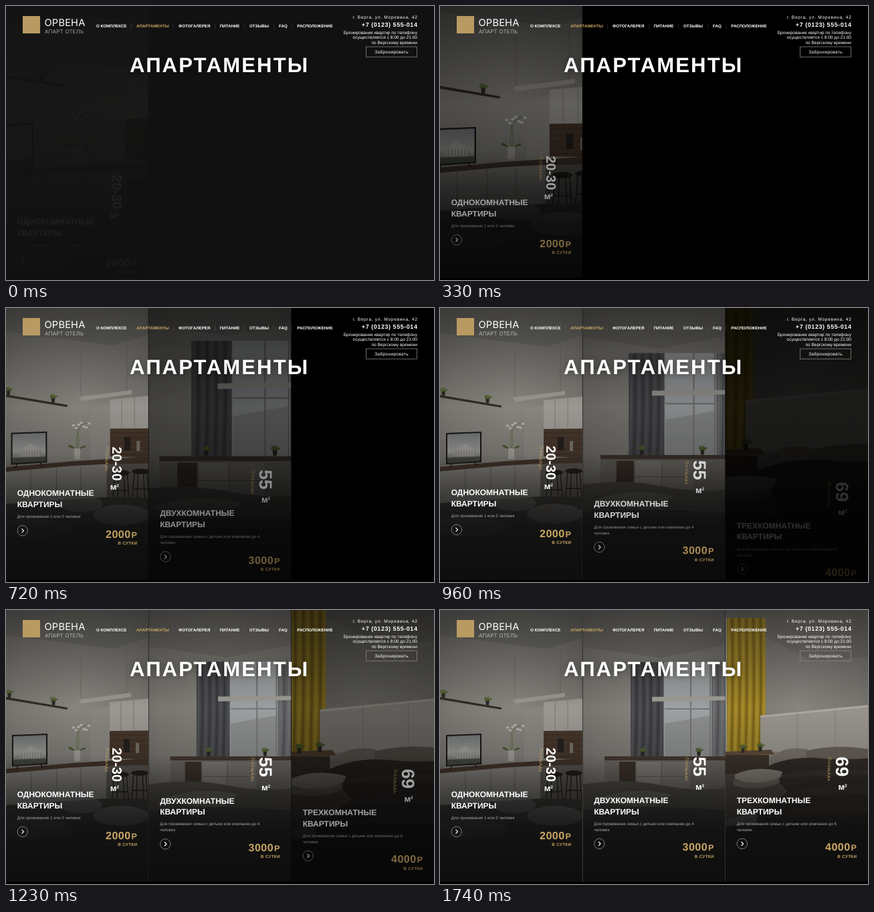
These frames come from a looping animation (640x410 px, 2700 ms). An HTML page:

```html
<!DOCTYPE html>
<html lang="ru">
<head>
<meta charset="utf-8">
<title>Апартаменты</title>
<style>
html, body { margin: 0; width: 100%; height: 100%; overflow: hidden; background: #000; }
svg { display: block; width: 640px; height: 410px; }
text { font-family: "Liberation Sans", Arial, sans-serif; fill: #fff; text-rendering: geometricPrecision; white-space: pre; }
.b { font-weight: 700; }
.gold { fill: #c9a765; }
.dim { fill: #a9a9a7; }
.logo { font-family: Inter, "Open Sans", sans-serif; }
.end { text-anchor: end; }
.mid { text-anchor: middle; }
.title { filter: drop-shadow(0 1px 5px rgba(0,0,0,.4)); }
</style>
</head>
<body>
<svg id="stage" viewBox="0 0 640 410"></svg>
<script>
const LOOP = 2700, STEP = 30, STAGGER = 450, RISE = 900, LEAD = 27;

// drawing helpers
const text = (x, y, size, str, cls = '', gap = 0, extra = '') =>
  `<text x="${x}" y="${y}" font-size="${size}" class="${cls}" letter-spacing="${gap}" ${extra}>${str}</text>`;
const down = (x, y, size, str, cls, gap) =>
  text(0, 0, size, str, cls, gap, `transform="translate(${x} ${y}) rotate(90)"`);
const rect = (x, y, w, h, fill, o = 1) =>
  `<rect x="${x}" y="${y}" width="${w}" height="${h}" fill="${fill}" opacity="${o}"/>`;
const poly = (pts, fill, o = 1) => `<polygon points="${pts}" fill="${fill}" opacity="${o}"/>`;
const path = (d, fill, o = 1) => `<path d="${d}" fill="${fill}" opacity="${o}"/>`;
const line = (d, color, w = 1, o = 1) =>
  `<path d="${d}" fill="none" stroke="${color}" stroke-width="${w}" opacity="${o}"/>`;
const oval = (x, y, rx, ry, fill, o = 1) =>
  `<ellipse cx="${x}" cy="${y}" rx="${rx}" ry="${ry}" fill="${fill}" opacity="${o}"/>`;
const range = (n, fn) => Array.from({ length: n }, (_, i) => fn(i)).join('');

const plant = (x, y, s = .7) =>
  range(9, i => {
    const a = (i - 4) * 0.25, r = s * (8 + (i % 3) * 1.5);
    return line(`M${x} ${y} L${x + Math.sin(a) * r} ${y - Math.cos(a) * r}`, i % 2 ? '#66753a' : '#465527', 1.4);
  }) + poly(`${x - 4 * s},${y - 1} ${x + 4 * s},${y - 1} ${x + 3 * s},${y + 8 * s} ${x - 3 * s},${y + 8 * s}`, '#2d2b28');

const folds = (x, y, w, bottom, n, base, dark, light) =>
  rect(x, y, w, bottom - y, base) + range(n, i => {
    const fx = x + (i + .5) * w / n;
    return line(`M${fx} ${y} Q${fx + 2} ${(y + bottom) / 2} ${fx - 1} ${bottom}`, i % 2 ? dark : light, w / n * .55, .6);
  });

const kitchen = () =>
  rect(-60, -60, 340, 530, 'url(#wall)') +
  poly('-60,-60 280,-60 280,20 160,58 -60,30', '#55534f', .3) +
  line('M112 134V70M180 126V60', '#5b5853', .4) +
  poly('109,134 187,124 187,130 113,140', '#a5a29c') +
  poly('-60,120 92,146 92,149 -60,124', '#352b24') +
  plant(5, 126) + plant(71, 137) +
  poly('126,150 158,144 158,235 126,232', '#918e88') +
  poly('155,138 280,126 280,180 155,181', '#a5a29c') +
  line('M172 138V180M191 135V179', '#75726c', .7) +
  poly('155,181 280,180 280,226 155,222', '#49382c') +
  range(5, i => line(`M155 ${187 + i * 8}H213`, '#36291f', .8)) +
  rect(176, 193, 9, 20, '#24201d') + rect(194, 199, 5, 15, '#7b766c') +
  poly('-60,243 100,229 213,222 280,224 280,232 95,237 -60,251', '#44362b') +
  poly('-60,250 95,236 150,233 150,284 -60,300', '#8d8a84') +
  line('M38 242V284M76 239V281M112 237V279', '#5d5a55', .8) +
  poly('150,233 280,231 280,285 150,284', '#5d5953') +
  poly('9,187 62,185 62,231 9,234', '#181715') +
  poly('11,189 60,187 60,229 11,232', 'url(#screen)') +
  poly('22,216 30,207 37,203 44,207 53,213 53,222 22,222', '#a8a6a0', .75) +
  range(8, i => line(`M${24 + i * 4} 213v9`, '#6c6963', .8)) +
  poly('11,224 60,222 60,229 11,232', '#3b4038', .8) +
  line('M18 233l-3 6M52 231l3 5', '#151412', 1.4) +
  line('M106 212Q104 190 110 180T124 174M107 212Q112 192 104 178', '#5f7040', .9) +
  range(7, i => oval(101 + i * 3.8, 176 + Math.sin(i * 1.7) * 4, 2.3, 1.8, '#c2beb8')) +
  path('M106 212Q92 200 94 208ZM107 212Q120 202 119 208Z', '#4a5a31') +
  rect(102, 210, 9, 16, '#aaa7a1') +
  range(2, i => {
    const x = 171 + i * 29, y = 246 - i * 2;
    return oval(x, y, 13, 4, '#211d1a') +
      line(`M${x - 9} ${y}l-4 48M${x + 9} ${y}l4 48M${x - 4} ${y}l-1 40M${x + 4} ${y}l2 40M${x - 11} ${y + 26}h22`, '#1a1715', 1.3);
  }) +
  poly('-60,296 150,282 280,284 280,470 -60,470', '#3d3a37') +
  oval(112, 292, 32, 12, '#7d7a75', .6) + oval(172, 308, 42, 15, '#8a8782', .6) +
  oval(40, 328, 60, 14, '#615e59', .5);

const lounge = () =>
  rect(150, -60, 340, 530, 'url(#wall)') +
  poly('150,-60 490,-60 490,40 330,72 150,46', '#5a5853', .3) +
  rect(330, 78, 160, 143, '#a9acae') +
  poly('336,170 404,158 404,220 336,220', '#8e8f8d', .7) +
  line('M334 78V220M375 78V220M404 78V220M336 148H404', '#7c7d7c', 2) +
  folds(285, 78, 49, 219, 9, '#4a4b4e', '#333437', '#5c5d60') +
  folds(406, 78, 80, 219, 13, '#6c6d6f', '#4c4d4f', '#7d7e80') +
  line('M325 130V74M420 130V74', '#5d5b57', .5) +
  poly('317,130 428,129 428,135 317,137', '#aaa7a1') +
  poly('246,219 490,219 490,225 246,225', '#463a31') +
  rect(246, 225, 244, 58, '#726e68') +
  rect(268, 227, 24, 46, '#3f332b') + rect(294, 227, 36, 46, '#8c8882') + rect(332, 227, 42, 46, '#827e78') +
  line('M294 249H330M332 249H374', '#57534d', .8) +
  plant(303, 213) + plant(387, 213) +
  path('M150 275Q250 246 330 262T490 254V470H150Z', '#55514b') +
  path('M236 282Q290 262 346 276L328 293Q276 298 236 282Z', '#8a857e', .5) +
  path('M150 310Q270 283 490 305V470H150Z', '#3f3c38');

const bedroom = () =>
  rect(365, -60, 340, 530, 'url(#wall)') +
  poly('365,-60 705,-60 705,62 560,78 470,32', '#66625b', .3) +
  rect(365, 12, 72, 203, '#a3a5a3') +
  line('M431 60V210', '#6f706d', 2) +
  folds(429, 12, 58, 217, 11, '#a08424', '#6c5516', '#c2a239') +
  poly('479,158 705,136 705,216 479,212', '#a29e96') +
  poly('479,158 705,136 705,139 479,161', '#b8b3aa') +
  line('M534 154V213M591 149V213', '#8a857d', .8) +
  poly('427,212 495,209 500,216 427,218', '#5f4d3b') +
  rect(427, 217, 65, 35, '#3f342c') +
  plant(479, 206) + plant(453, 208) +
  path('M492 224Q512 203 548 208L566 216Q535 228 494 231Z', '#7d766d') +
  path('M548 211Q588 200 640 208H705V226Q590 229 548 220Z', '#6b645b') +
  path('M482 238Q520 217 570 222T705 215V470H440Q480 310 482 238Z', '#332d28') +
  path('M490 252Q560 231 705 244M500 280Q570 252 705 272M512 304Q580 278 705 304', '#4a4139', .4) +
  path('M365 258Q420 238 500 250L520 272Q440 330 365 310Z', '#544d45') +
  path('M441 246Q474 232 512 242Q512 250 500 256Q464 263 441 253Z', '#a09a91', .85) +
  path('M438 254Q470 264 508 250V258Q480 273 440 263Z', '#7a746c', .85) +
  path('M365 338Q500 300 705 330V470H365Z', '#2b2724');

// offsets inside a card; the last two cards share one layout
const narrow = { top: 280, areaX: 158.8, areaY: 206, areaSize: 20, labelX: 149.1, unitX: 155.7, unitY: 271, priceY: 342.8 };
const wide = { top: 289, areaX: 165.2, areaY: 219.5, areaSize: 26.7, labelX: 153.2, unitX: 168.5, unitY: 269, priceY: 360.3 };
const cards = [
  { ...narrow, x: 0, scene: kitchen, name: 'ОДНОКОМНАТНЫЕ', note: ['Для проживания 1 или 2 человек'], area: '20-30', price: '2000' },
  { ...wide, x: 213.5, scene: lounge, name: 'ДВУХКОМНАТНЫЕ', area: '55', price: '3000',
    note: ['Для проживания семьи с детьми или компании до 4', 'человек'] },
  { ...wide, x: 427, scene: bedroom, name: 'ТРЕХКОМНАТНЫЕ', area: '69', price: '4000',
    note: ['Для проживания семьи с детьми или компании до 6', 'человек'] }
];

const info = c => {
  const left = c.x + 16.7, right = c.x + 196, unit = c.x + c.unitX;
  const ring = c.top + 42.7 + c.note.length * 9, cx = c.x + 24.8;
  return down(c.x + c.areaX, c.areaY, c.areaSize, c.area, 'b', 0) +
    down(c.x + c.labelX, c.areaY + .8, 6.67, 'Площадь', 'gold', 1.1) +
    text(unit, c.unitY, 13, 'м', 'b') + text(unit + 9.5, c.unitY - 4, 6.5, '2', 'b') +
    text(left, c.top, 12, c.name, 'b') + text(left, c.top + 16.5, 12, 'КВАРТИРЫ', 'b') +
    c.note.map((s, i) => text(left, c.top + 32.8 + i * 9, 6.2, s, 'dim')).join('') +
    `<circle cx="${cx}" cy="${ring}" r="7.7" fill="none" stroke="#aaa" stroke-width=".7"/>` +
    line(`M${cx - 1.3} ${ring - 3}l3 3l-3 3`, '#fff', 1.2) +
    text(c.x + 149, c.priceY, 16, c.price, 'b gold', .5) +
    text(right, c.priceY, 12.6, 'Р', 'b gold end') +
    text(right + .3, c.priceY + 10.2, 6.3, 'В СУТКИ', 'b gold end', .3);
};

const card = (c, i) => `<g id="card${i}" clip-path="url(#clip${i})">
  <g class="scene">${c.scene()}</g>
  ${rect(c.x, 0, 213, 410, 'url(#shade)')}
  <g class="info">${info(c)}</g></g>`;

const menu = [[135, 'О КОМПЛЕКСЕ'], [195, 'АПАРТАМЕНТЫ'], [258, 'ФОТОГАЛЕРЕЯ'], [319.7, 'ПИТАНИЕ'],
  [364, 'ОТЗЫВЫ'], [408, 'FAQ'], [435.3, 'РАСПОЛОЖЕНИЕ']];

const header = () =>
  rect(25, 15, 26, 26, '#b99a62') +
  text(57.5, 30, 14.6, 'ОРВЕНА', 'logo', .2) +
  text(58, 41.2, 7.9, 'АПАРТ ОТЕЛЬ', 'logo', .3, 'font-weight="300" opacity=".8"') +
  menu.map(([x, s], i) => text(x, 32.4, 6.2, s, i === 1 ? 'b gold' : 'b') +
    (i ? rect(x - 7.6, 26, .6, 9, '#666', .5) : '')).join('') +
  text(615.5, 19.4, 6.67, 'г. Верга, ул. Моревина, 42', 'end', .65) +
  text(615.5, 31.2, 9, '+7 (0123) 555-014', 'b end', .55) +
  ['Бронирование квартир по телефону', 'осуществляется с 8:00 до 21:00', 'по Вергскому времени']
    .map((s, i) => text(615, 42 + i * 7.4, 6.55, s, 'end')).join('') +
  '<rect x="538.5" y="61" width="76" height="15.2" fill="none" stroke="#8a867e" stroke-width=".8"/>' +
  text(576.6, 71, 6.67, 'Забронировать', 'mid', .25) +
  text(185, 99.4, 31.1, 'АПАРТАМЕНТЫ', 'b title', 2.1);

const stops = list => list.map(([at, color, o = 1]) =>
  `<stop offset="${at}" stop-color="${color}" stop-opacity="${o}"/>`).join('');

const stage = document.getElementById('stage');
stage.innerHTML = `<defs>
  <radialGradient id="wall" cx=".5" cy=".38" r=".55">${stops([[0, '#918e88'], [.5, '#827f79'], [1, '#666460']])}</radialGradient>
  <linearGradient id="screen" x2="0" y2="1">${stops([[0, '#74787b'], [.6, '#a09f9a'], [1, '#5c5d57']])}</linearGradient>
  <linearGradient id="shade" x2="0" y2="1">${stops([[0, '#0c0c0c', .5], [.2, '#0c0c0c', .26], [.36, '#0c0c0c', .07],
    [.53, '#0c0c0c', .2], [.66, '#0c0c0c', .56], [.8, '#0c0c0c', .85], [1, '#0c0c0c', .97]])}</linearGradient>
  ${cards.map((c, i) => `<clipPath id="clip${i}">${rect(c.x, 0, i < 2 ? 212.8 : 213, 407, '#000')}</clipPath>`).join('')}
  </defs><rect id="back" width="640" height="410"/>${cards.map(card).join('')}${header()}`;

const back = document.getElementById('back');
const parts = cards.map((c, i) => {
  const root = document.getElementById('card' + i);
  return { root, mid: c.x + 106.5, scene: root.querySelector('.scene'), info: root.querySelector('.info') };
});

function draw(time) {
  const t = Math.floor(time % LOOP / STEP) * STEP;
  const gray = Math.round(17 * Math.max(0, 1 - t / 150));
  back.setAttribute('fill', `rgb(${gray},${gray},${gray})`);
  parts.forEach((p, i) => {
    const u = Math.min(1, Math.max(0, (t + LEAD - STAGGER * i) / RISE));
    const rest = (1 - u) ** 2;
    p.root.setAttribute('opacity', 1 - rest);
    p.info.setAttribute('transform', `translate(0 ${50 * rest})`);
    p.scene.setAttribute('transform',
      `translate(${p.mid} 207) scale(${1 + rest / 2}) translate(${-p.mid} -207)`);
  });
}

const start = performance.now();
function tick() {
  draw(performance.now() - start);
  requestAnimationFrame(tick);
}
tick();
</script>
</body>
</html>
```
